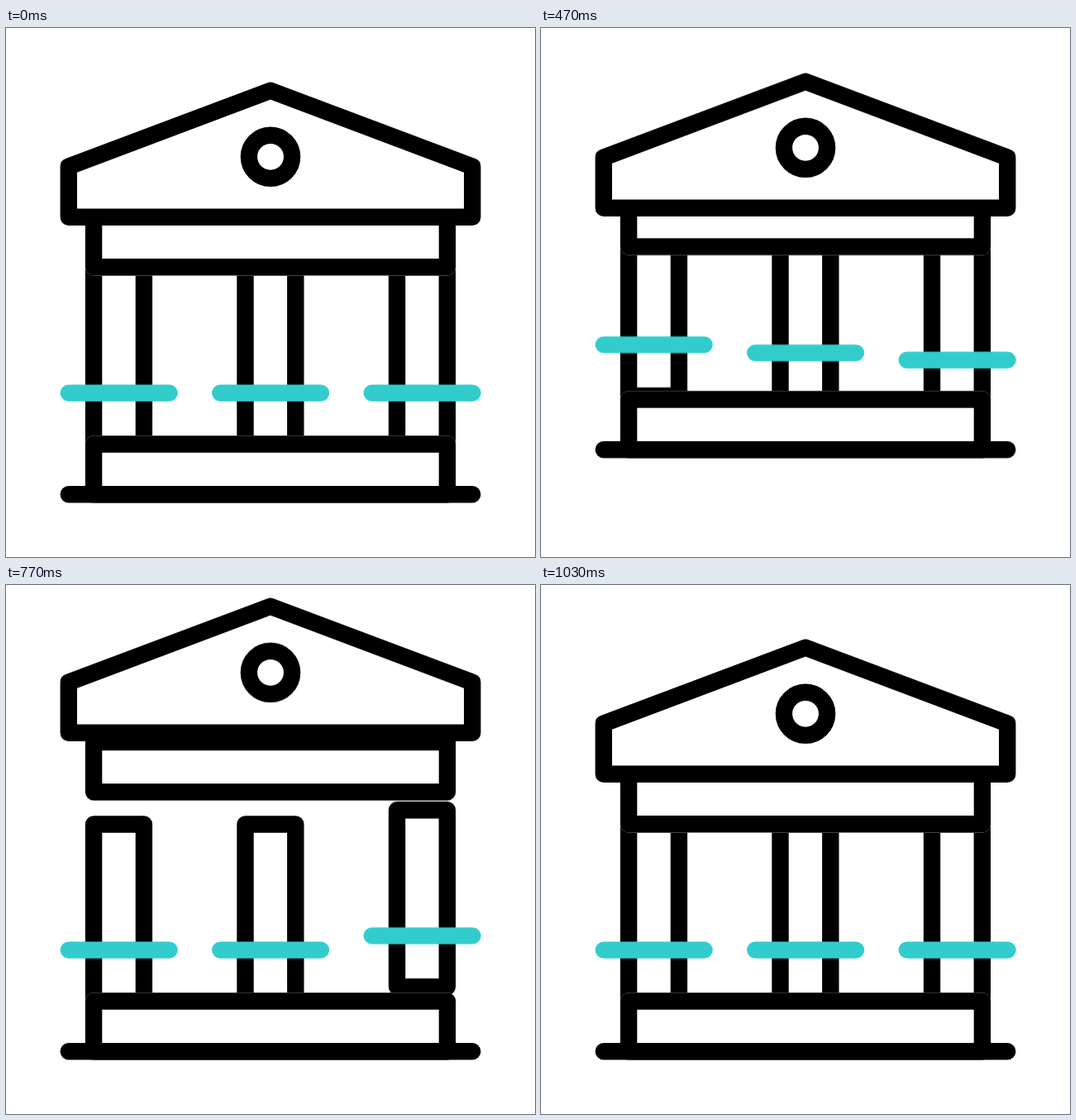
An HTML page that plays this animation: 640x640 px, repeating every 1.67 s.

```html
<!DOCTYPE html>
<html lang="en">
<head>
<meta charset="utf-8">
<title>Bank</title>
<style>
  html, body { margin: 0; height: 100%; overflow: hidden; background: #fff; }
  svg { display: block; width: 100vw; height: 100vh; }
  path { stroke-width: 20.4; stroke-linecap: round; stroke-linejoin: round; }
  .back { fill: #fff; stroke: #fff; }
  .line { fill: none; stroke: #000; }
  .bar { fill: none; stroke: #3cc; }
</style>
</head>
<body>
<svg id="stage" viewBox="0 0 640 640"></svg>
<script>
  const LOOP = 1670;
  const LIFT = 58.5;
  const RISE = 'cubic-bezier(.3, 0, .77, 1)';
  const FALL = 'cubic-bezier(.23, 0, .77, 1)';
  const stage = document.getElementById('stage');

  const path = (kind, d) => `<path class="${kind}" d="${d}"/>`;
  const solid = d => path('back', d) + path('line', d);
  const box = (x, y, w, h) => solid(`M${x} ${y}h${w}v${h}h${-w}z`);
  const column = x =>
    box(x, 289.5, 60.8, 214) + path('bar', `M${x - 30.3} 441.6h121.8`);

  // Each part hops once: start, peak and landing in ms.
  const parts = [
    [column(106.1), 190, 472, 704],
    [column(289.5), 190, 546, 763],
    [column(473), 190, 609, 848],
    [box(106.1, 503.5, 427.8, 60.7) + path('line', 'M75.8 564.2H564.2'), 190, 435, 664],
    [box(106.1, 228.8, 427.8, 60.5), 323, 630, 996],
    [solid('M75.8 228.8V167.6L320 75.8L564.2 167.6V228.8z') +
      path('line', 'M293.9 155.8a26.1 26.1 0 1 1 52.2 0a26.1 26.1 0 1 1 -52.2 0z'), 378, 695, 1033]
  ];

  const hops = parts.map(([shapes, start, peak, land]) => {
    const group = document.createElementNS('http://www.w3.org/2000/svg', 'g');
    group.innerHTML = shapes;
    stage.append(group);
    const rest = 'translateY(0px)';
    const hop = group.animate([
      { transform: rest, offset: 0 },
      { transform: rest, offset: start / LOOP, easing: RISE },
      { transform: `translateY(${-LIFT}px)`, offset: peak / LOOP, easing: FALL },
      { transform: rest, offset: land / LOOP },
      { transform: rest, offset: 1 }
    ], { duration: LOOP, iterations: Infinity });
    hop.pause();
    return hop;
  });

  // Thirty poses a second, changing at 0, 30 and 70 ms of every 100.
  function poseTime(t) {
    const part = t % 100;
    const step = part >= 70 ? 2 : part >= 30 ? 1 : 0;
    return (Math.floor(t / 100) * 3 + step) * 100 / 3;
  }

  const begin = performance.now();
  function draw() {
    const time = poseTime((performance.now() - begin) % LOOP);
    for (const hop of hops) hop.currentTime = time;
    requestAnimationFrame(draw);
  }
  draw();
</script>
</body>
</html>
```
